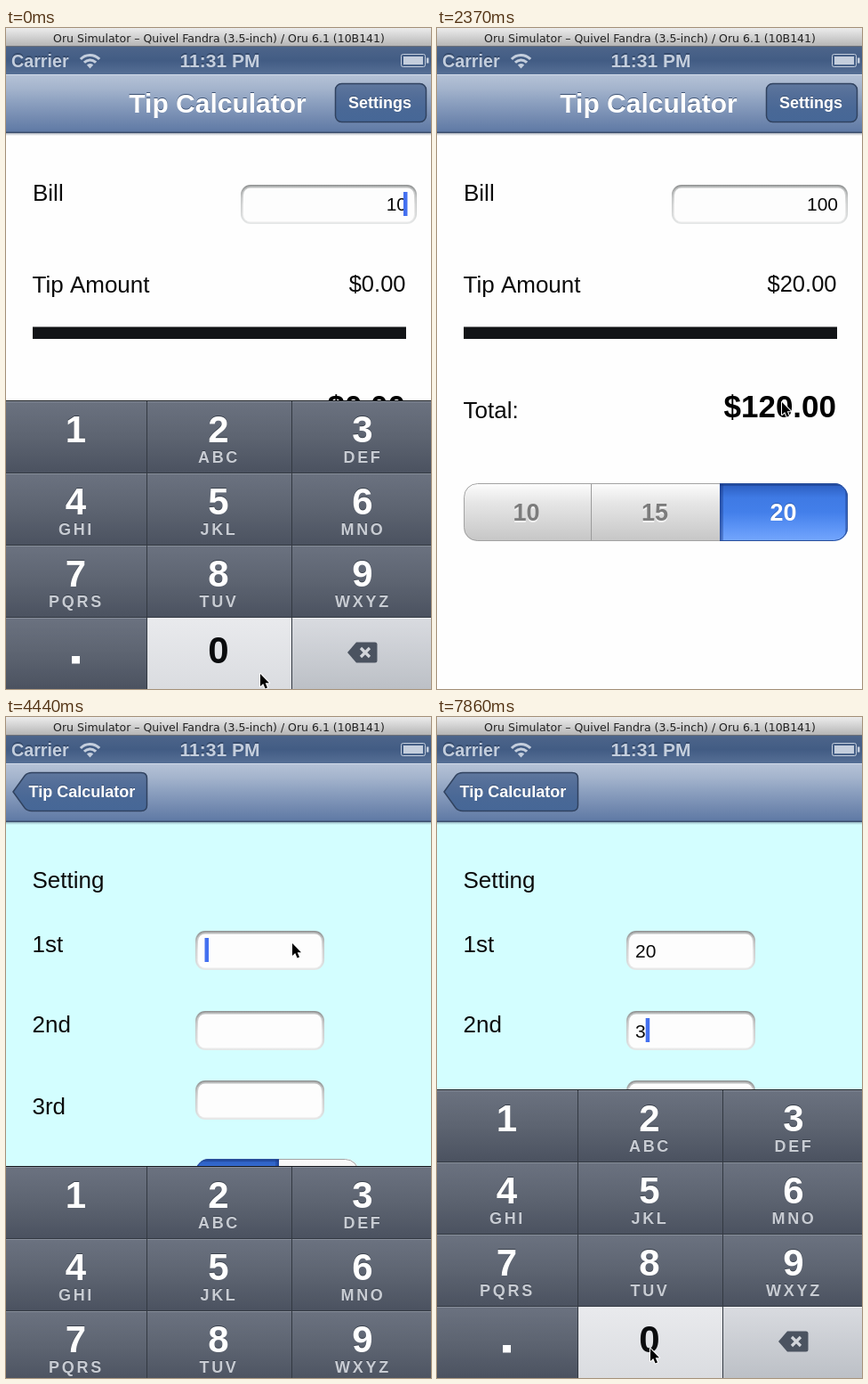
An HTML page with a canvas that plays this animation: 478x742 px, repeating every 8 s.

```html
<!DOCTYPE html>
<html lang="en">
<head>
<meta charset="utf-8">
<title>Tip Calculator</title>
<style>
html, body { margin: 0; width: 100%; height: 100%; overflow: hidden; background: #fff; }
canvas { display: block; }
</style>
</head>
<body>
<canvas id="stage" width="478" height="742"></canvas>
<script>
const W = 478, H = 742, LOOP = 8000, STEP = 148.1;
const c = document.getElementById('stage').getContext('2d');
const SANS = '"Liberation Sans", Arial, sans-serif';

// pointer path: [step, x, y]
const PATH = [
  [0, 286, 725], [1, 286, 725], [4, 262, 385], [5, 258, 385], [10, 225, 532], [11, 225, 532],
  [13, 378, 540], [14, 378, 540], [16, 388, 420], [21, 410, 100], [26, 410, 100],
  [29, 322, 254], [30, 322, 254], [32, 308, 330], [35, 242, 455], [36, 242, 455],
  [39, 264, 705], [40, 264, 705], [42, 313, 346], [44, 313, 346], [47, 398, 455],
  [48, 398, 455], [51, 245, 669], [52, 240, 709], [54, 240, 709]
];
const KEYS = ['1', '2 ABC', '3 DEF', '4 GHI', '5 JKL', '6 MNO', '7 PQRS', '8 TUV', '9 WXYZ', '.', '0', 'del'];
const KEY_X = [0, 159, 322, 479], KEY_MID = [78.5, 239, 401];

const ease = (n, start, len) => {
  const p = Math.min(1, Math.max(0, (n - start) / len));
  return p * p * (3 - 2 * p);
};

function grad(y0, y1, ...colors) {
  const g = c.createLinearGradient(0, y0, 0, y1);
  colors.forEach((col, i) => g.addColorStop(i / (colors.length - 1), col));
  return g;
}

function rect(x, y, w, h, fill) {
  c.fillStyle = fill;
  c.fillRect(x, y, w, h);
}

function round(x, y, w, h, r, fill, stroke) {
  c.beginPath();
  c.roundRect(x, y, w, h, r);
  if (fill) { c.fillStyle = fill; c.fill(); }
  if (stroke) { c.strokeStyle = stroke; c.lineWidth = 1; c.stroke(); }
}

function text(s, x, y, size, { color = '#0b0b0b', bold, align = 'left', shadow, dy = -1.5, gap = 0, font = SANS } = {}) {
  c.font = `${bold ? 'bold ' : ''}${size}px ${font}`;
  c.textAlign = align;
  c.letterSpacing = gap + 'px';
  if (shadow) { c.fillStyle = shadow; c.fillText(s, x, y + dy); }
  c.fillStyle = color;
  c.fillText(s, x, y);
  c.letterSpacing = '0px';
}

function shifted(x, draw, alpha = 1) {
  c.save();
  c.globalAlpha = alpha;
  c.translate(Math.round(x), 0);
  draw();
  c.restore();
}

const caret = (x, y) => rect(x, y, 4.5, 27, '#4470f0');

function field(x, y, w) {
  round(x, y, w, 44, 11, grad(y, y + 44, '#8f9191', '#c2c4c4', '#cfd1d1', '#e6e8e8'));
  round(x + 1.5, y + 1.5, w - 3, 41, 10, grad(y, y + 44, '#b6b8b8', '#e6e6e6', '#ededed'));
  round(x + 3, y + 3.5, w - 6, 38, 8, '#fdfdfd');
}

// edges: left side of each segment plus the final right side
function segments(edges, y, labels, selected) {
  const x = edges[0], w = edges[edges.length - 1] - x, h = 65;
  const outline = color => round(x + .5, y + .5, w - 1, h - 1, 15, null, color);
  c.save();
  round(x, y, w, h, 15);
  c.clip();
  rect(x, y, w, h, grad(y, y + h, '#fdfdfd', '#e6e6e6', '#d6d6d6', '#c6c6c6'));
  edges.slice(1, -1).forEach(edge => rect(edge, y, 1, h, '#9b9b9b'));
  outline('#a2a2a2');

  const a = edges[selected] - 1, cell = edges[selected + 1] + 1 - a;
  c.save();
  c.beginPath();
  c.rect(a, y, cell, h);
  c.clip();
  rect(a, y, cell, h, grad(y, y + h, '#2a5bbd', '#3f7ae4', '#437fea', '#5b93f5', '#74a6fd'));
  rect(a, y, cell, 3, 'rgba(20,45,110,.4)');
  for (const k of [2, 4]) {
    rect(a, y, k, h, 'rgba(20,50,125,.35)');
    rect(a + cell - k, y, k, h, 'rgba(20,50,125,.35)');
  }
  outline('#2a4f9a');
  c.restore();

  labels.forEach((label, i) => {
    const on = i === selected;
    text(label, (edges[i] + edges[i + 1]) / 2 - (labels.length > 2 ? 1 : 0), y + 42, 27, {
      bold: true, align: 'center', color: on ? '#fff' : '#7c7c7c',
      shadow: on ? '#2c5cb4' : '#f4f4f4', dy: on ? -1.5 : 1.5
    });
  });
  c.restore();
}

function mainView(n) {
  rect(0, 118, W, H, '#fefefe');
  const choice = n < 10 ? 0 : n < 13 ? 1 : 2;
  const tip = n < 5 ? 0 : 10 + 5 * choice;
  const total = tip ? 100 + tip : 0;
  text('Bill', 30, 194, 26);
  field(264, 176, 198);
  text(n < 1 ? '10' : '100', 451, 205, 21, { align: 'right' });
  if (n < 5) caret(447, 184);
  text('Tip Amount', 29.5, 297, 26);
  text(`$${tip}.00`, 449.5, 296, 25.5, { align: 'right' });
  rect(30, 335.5, 420, 13.5, '#121417');
  text('Total:', 29.5, 438, 26);
  text(`$${total}.00`, 449, 436.5, 35, { bold: true, align: 'right', color: '#000' });
  segments([30, 173, 319, 462], 511, ['10', '15', '20'], choice);
}

function settingsView(n) {
  rect(0, 118, W, H, '#d3feff');
  [['Setting', 192], ['1st', 264], ['2nd', 354], ['3rd', 446], ['theme', 528]]
    .forEach(([s, y]) => text(s, 29.5, y, 26));
  const values = [n < 36 ? '' : n < 40 ? '2' : '20', n < 48 ? '' : '3', ''];
  const focus = n < 29 ? -1 : n < 44 ? 0 : 1;
  [240, 330, 408].forEach((y, i) => {
    field(213, y, 145);
    text(values[i], 223, y + 29.5, 21);
    if (i === focus) caret(223.5 + values[i].length * 11.2, y + 8);
  });
  segments([213, 306, 397], 496, ['Light', 'Dark'], 0);
  round(337.5, 601.5, 112, 33, 10, '#fdfdfd', '#a3a8a8');
  text('Save', 393, 627, 22, { bold: true, align: 'center', color: '#38528a' });
}

function barButton(trace) {
  c.beginPath();
  trace();
  c.fillStyle = grad(62, 106, '#5f779d', '#526d98', '#496896', '#466797');
  c.fill();
  c.strokeStyle = '#30425f';
  c.lineWidth = 1.5;
  c.stroke();
}

const barText = (s, x, y, size, align) =>
  text(s, x, y, size, { bold: true, color: '#fff', align, shadow: '#3d5274' });

function backButton() {
  barButton(() => {
    c.moveTo(8, 84);
    c.lineTo(21, 66);
    c.quadraticCurveTo(24, 62.5, 29, 62.5);
    c.lineTo(152, 62.5);
    c.quadraticCurveTo(158.5, 62.5, 158.5, 69);
    c.lineTo(158.5, 99);
    c.quadraticCurveTo(158.5, 105.5, 152, 105.5);
    c.lineTo(29, 105.5);
    c.quadraticCurveTo(24, 105.5, 21, 102);
    c.closePath();
  });
  barText('Tip Calculator', 25.5, 90, 18);
}

function navBar(push) {
  rect(0, 52, W, 66, grad(52, 118, '#b6c3d7', '#a3b3cc', '#8a9ebe', '#738ab0', '#5d78a4'));
  rect(0, 52, W, 1, '#d3dcea');
  rect(0, 116.5, W, 1.5, '#3c4e6d');
  rect(0, 118, W, 3, grad(118, 121, 'rgba(60,75,100,.4)', 'rgba(60,75,100,0)'));
  if (push < 1) {
    shifted(-150 * push, () => barText('Tip Calculator', 238, 95, 30, 'center'), 1 - push);
    shifted(0, () => {
      barButton(() => c.roundRect(370.5, 62.5, 102, 43, 7));
      barText('Settings', 420.5, 90, 18, 'center');
    }, 1 - push);
  }
  if (push > 0) shifted(Math.ceil(130 * (1 - push)), backButton, push);
}

function statusBar() {
  rect(0, 0, W, 21, grad(0, 21, '#ececec', '#d0d0d0', '#b2b2b2'));
  rect(0, 20, W, 1, '#6c7078');
  text('Oru Simulator – Quivel Fandra (3.5-inch) / Oru 6.1 (10B141)', 239.5, 16, 12.5,
    { align: 'center', color: '#222', font: '"DejaVu Sans", sans-serif' });
  rect(0, 21, W, 31, grad(21, 52, '#4d658a', '#425c84', '#566f95'));
  const ink = '#c4cedd';
  text('Carrier', 6, 43.5, 19.7, { bold: true, color: ink, shadow: '#364b6c' });
  text('11:31 PM', 240.5, 43.5, 21, { bold: true, color: ink, align: 'center', shadow: '#364b6c' });
  c.strokeStyle = c.fillStyle = ink;
  c.lineWidth = 3;
  for (const r of [9, 14.5]) {
    c.beginPath();
    c.arc(94.5, 45, r, -Math.PI * .76, -Math.PI * .24);
    c.stroke();
  }
  c.beginPath();
  c.moveTo(94.5, 45.5);
  c.arc(94.5, 45, 5, -Math.PI * .76, -Math.PI * .24);
  c.fill();
  round(444.5, 29.5, 27, 14, 2, null, ink);
  rect(447, 32, 22, 9, ink);
  rect(473, 33.5, 2.5, 6, ink);
}

function delIcon() {
  c.fillStyle = '#4b5360';
  c.beginPath();
  c.moveTo(384, 701);
  c.lineTo(394, 689.5);
  c.lineTo(415, 689.5);
  c.quadraticCurveTo(417.5, 689.5, 417.5, 692);
  c.lineTo(417.5, 710);
  c.quadraticCurveTo(417.5, 712.5, 415, 712.5);
  c.lineTo(394, 712.5);
  c.fill();
  c.strokeStyle = '#d2d5da';
  c.lineWidth = 3.2;
  c.beginPath();
  c.moveTo(399, 696); c.lineTo(409, 706);
  c.moveTo(409, 696); c.lineTo(399, 706);
  c.stroke();
}

function keyboard(top, pressed) {
  c.save();
  c.translate(0, Math.round(top) - 418);
  rect(0, 418, W, 1, '#15181d');
  KEYS.forEach((key, i) => {
    const col = i % 3, row = (i - col) / 3;
    const x = KEY_X[col], y = 419 + 81 * row, w = KEY_X[col + 1] - x - 1;
    const [digit, letters] = key.split(' ');
    const down = digit === pressed, mid = KEY_MID[col];
    rect(x, y, w + 1, 81, '#333942');
    rect(x, y, w, 80, digit === 'del' ? grad(y, y + 80, '#d9dbe0', '#bcc0c6')
      : down ? grad(y, y + 80, '#e9eaed', '#dadce0') : grad(y, y + 80, '#6b7280', '#5d6471', '#4b5260'));
    if (!down) rect(x, y, w, 1, digit === 'del' ? '#f0f1f3' : '#878e9a');
    if (digit === 'del') return delIcon();
    if (digit === '.') return rect(74, 705, 9, 8.5, '#fff');
    const shadow = down ? null : '#3a414c';
    text(digit, mid, row === 3 ? 713 : 465 + 81 * row, 42,
      { bold: true, align: 'center', color: down ? '#0b0c0e' : '#fff', shadow });
    if (letters) text(letters, mid + .5, 488 + 81 * row, 18,
      { bold: true, align: 'center', color: down ? '#22262c' : '#c8ccd3', gap: 2.7, shadow });
  });
  c.restore();
}

function pointer(n) {
  const i = PATH.findIndex(p => p[0] > n) - 1;
  const [n0, x0, y0] = PATH[i], [n1, x1, y1] = PATH[i + 1];
  const k = (n - n0) / (n1 - n0);
  c.save();
  c.translate(Math.round(x0 + (x1 - x0) * k), Math.round(y0 + (y1 - y0) * k));
  c.beginPath();
  [[0, 0], [0, 14], [3.2, 11], [5.6, 16.5], [8, 15.4], [5.7, 10.2], [10, 10.2]]
    .forEach(([x, y]) => c.lineTo(x, y));
  c.closePath();
  c.lineJoin = 'round';
  c.strokeStyle = '#fff';
  c.lineWidth = 2;
  c.stroke();
  c.fillStyle = '#000';
  c.fill();
  c.restore();
}

function draw(n) {
  const push = ease(n, 23.02, 2.06);
  if (push < 1) shifted(-W * push, () => mainView(n));
  if (push > 0) shifted(W * (1 - push), () => settingsView(n));
  navBar(push);
  statusBar();
  const shown = n < 20 ? 1 - ease(n, 4.3, 1.69) : ease(n, 28.88, 1.69);
  const pressed = n < 2 || n === 40 || n === 53 ? '0' : n === 35 ? '2' : n === 47 ? '3' : '';
  if (shown > 0) keyboard(742 - 324 * shown, pressed);
  pointer(n);
}

// the screen refreshes in steps, like a screen recording
function tick() {
  const t = performance.now() % LOOP;
  draw(Math.min(53, Math.floor((t + 12) / STEP)));
  requestAnimationFrame(tick);
}
tick();
</script>
</body>
</html>
```
